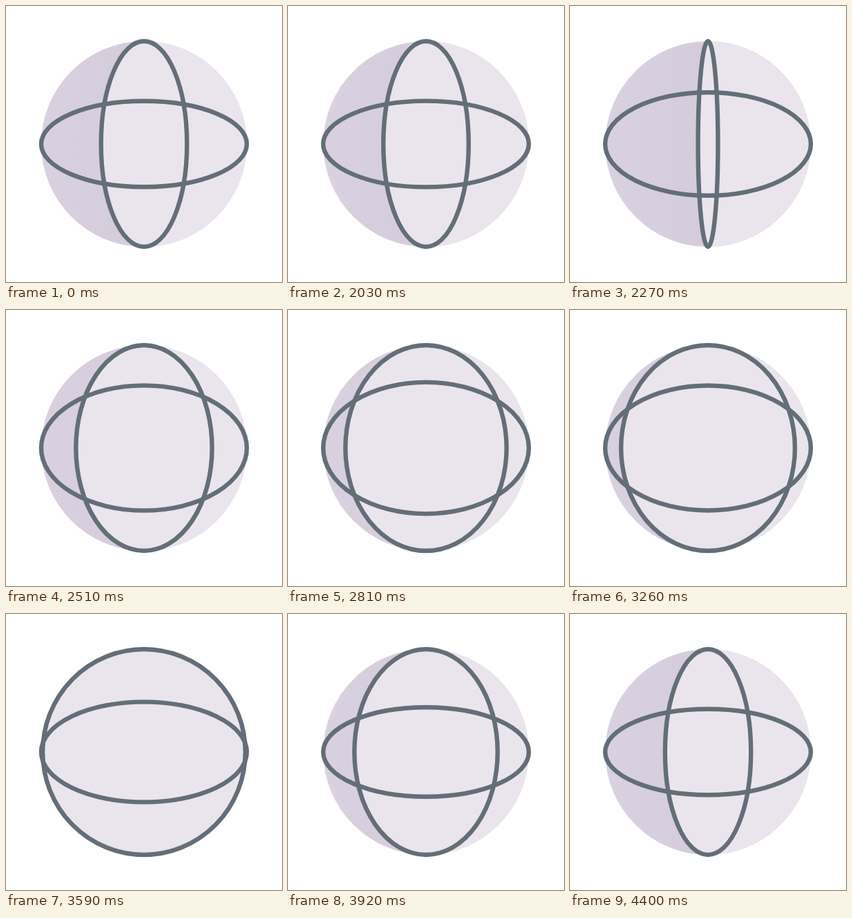
An HTML page for the animation above (4.43 s loop, 400 px wide and 400 px high).

```html
<!DOCTYPE html>
<html lang="en">
<head>
<meta charset="utf-8">
<title>Turning globe</title>
<style>
  html, body { margin: 0; width: 100%; height: 100%; overflow: hidden; background: #fff; }
  svg { display: block; width: 100vw; height: 100vh; }
</style>
</head>
<body>
<svg viewBox="0 0 400 400">
  <defs>
    <linearGradient id="shade" gradientUnits="userSpaceOnUse" x1="51" y1="0" x2="200" y2="0">
      <stop offset="0" stop-color="#d9d1e0"/>
      <stop offset="1" stop-color="#d4ccdb"/>
    </linearGradient>
  </defs>
  <circle cx="200" cy="200" r="149" fill="url(#shade)"/>
  <path id="light" fill="#eae5ec"/>
  <g fill="none" stroke="#636e78" stroke-width="6.4">
    <ellipse id="parallel" cx="200" cy="200" rx="149"/>
    <ellipse id="meridian" cx="200" cy="200" ry="149"/>
  </g>
</svg>
<script>
const LOOP = 4430, HOLD = 2000, STEP = 30;
const R = 149, REST = 24.7;
const light = document.getElementById('light');
const parallel = document.getElementById('parallel');
const meridian = document.getElementById('meridian');

const bez = (a, b, s) => 3 * a * s * (1 - s) ** 2 + 3 * b * s * s * (1 - s) + s ** 3;

// cubic-bezier(.4, 0, .2, 1)
function ease(x) {
  if (x <= 0) return 0;
  if (x >= 1) return 1;
  let lo = 0, hi = 1;
  for (let i = 0; i < 30; i++) {
    const mid = (lo + hi) / 2;
    if (bez(0.4, 0.2, mid) < x) lo = mid; else hi = mid;
  }
  return bez(0, 1, lo);
}

const move = (n, from, to, amount) => amount * ease((n - from) / (to - from));
const radius = deg => Math.abs(R * Math.sin(deg * Math.PI / 180));

function draw(ms) {
  const n = Math.max(0, Math.floor((ms % LOOP - HOLD) / STEP + 0.01));
  const spin = REST - move(n, 0, 29, 76.5) - move(n, 29, 80, 283.5);
  const tilt = REST + move(n, 0, 30.4, 15.2) - move(n, 31.8, 78.8, 15.2);
  const rx = Math.max(radius(spin), 0.1);
  meridian.setAttribute('rx', rx);
  parallel.setAttribute('ry', radius(tilt));
  light.setAttribute('d', `M200 51A${R} ${R} 0 0 1 200 349A${rx} ${R} 0 0 1 200 51Z`);
}

const start = performance.now();
function tick() {
  draw(performance.now() - start);
  requestAnimationFrame(tick);
}
tick();
</script>
</body>
</html>
```
